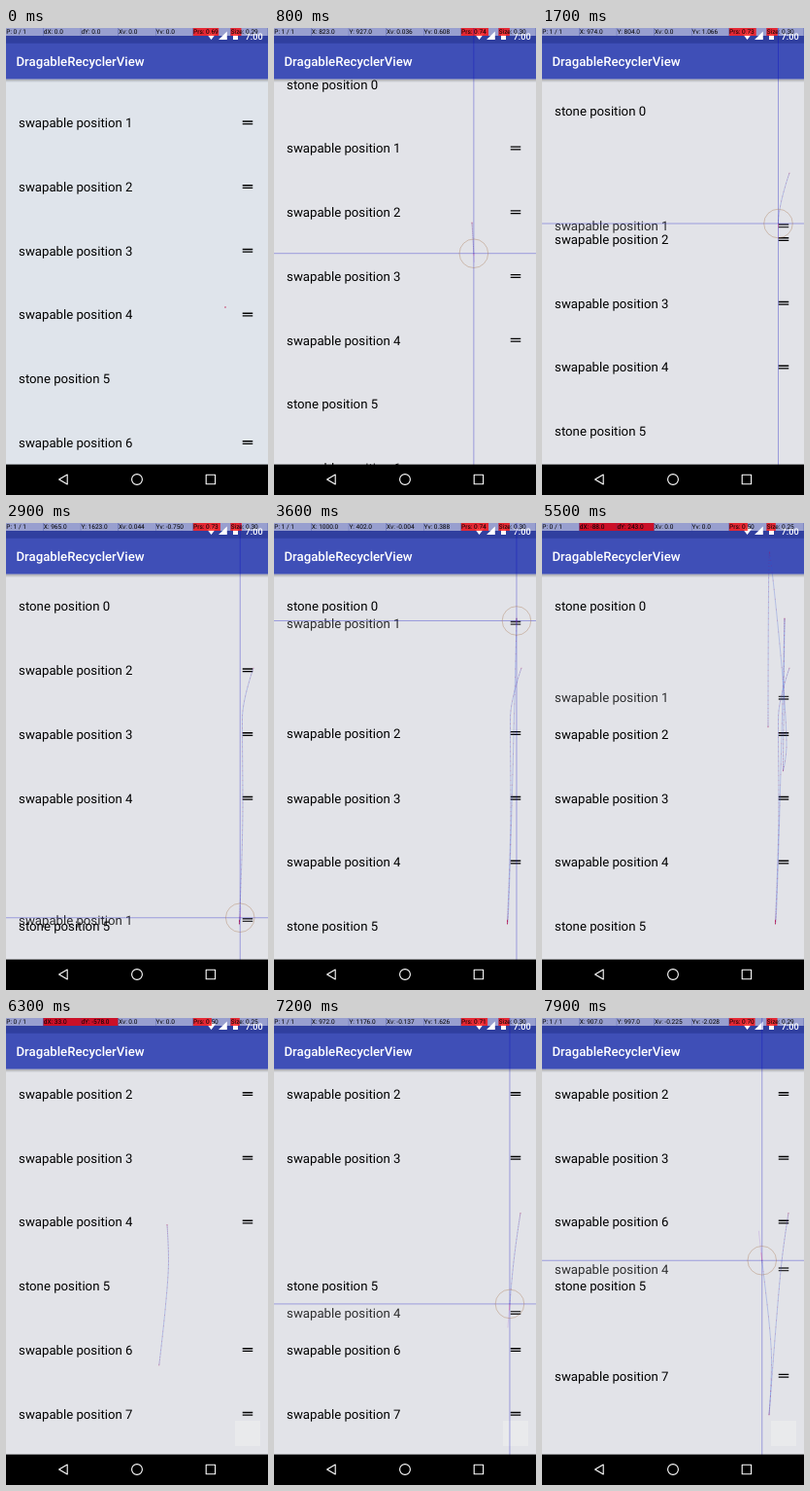
These frames come from a looping animation (270 by 480 pixels, 8 s). An HTML page:

```html
<!DOCTYPE html>
<html lang="en">
<head>
<meta charset="utf-8">
<title>Draggable list</title>
<style>
  html, body { margin: 0; width: 100%; height: 100%; overflow: hidden; background: #000; }
  svg { display: block; width: 270px; height: 480px; font-family: Roboto, sans-serif; text-rendering: geometricPrecision; }
  .row { font-size: 13.2px; fill: #000; }
  .title { font-size: 13.2px; font-weight: 500; fill: #fff; }
  .clock { font-size: 9.2px; font-weight: 500; fill: #fff; }
  .cell { font-size: 6.56px; fill: #000; }
  .plain { fill: #fff; fill-opacity: .5; }
  .level { fill: #f00; fill-opacity: .75; }
  .cross { stroke: #0000c0; stroke-opacity: .36; stroke-width: .9; }
  .ring { fill: none; stroke: #a87850; stroke-opacity: .55; stroke-width: .7; }
  .trace { fill: none; stroke: #2850d8; stroke-opacity: .5; stroke-width: .5; }
  .dots { fill: none; stroke: #c00040; stroke-opacity: .45; stroke-width: .6; stroke-linecap: round; }
  .guess { stroke: #8020d0; stroke-opacity: .3; stroke-width: .5; }
  .speed { stroke: #ff4080; stroke-opacity: .6; stroke-width: .5; }
  .nav { fill: none; stroke: #fff; stroke-width: 1.1; stroke-linejoin: round; }
</style>
</head>
<body>
<svg viewBox="0 0 270 480">
  <defs>
    <linearGradient id="shade" x2="0" y2="1">
      <stop offset="0" stop-opacity=".28"/>
      <stop offset="1" stop-opacity="0"/>
    </linearGradient>
  </defs>
  <rect id="page" width="270" height="449"/>
  <g id="rows"></g>
  <rect id="patch" x="236" y="414" width="26" height="26" fill="#e9eaec"/>

  <rect y="52.5" width="270" height="3.5" fill="url(#shade)"/>
  <rect width="270" height="16" fill="#303f9f"/>
  <rect y="15.75" width="270" height="36.75" fill="#3f4fb7"/>
  <text class="title" x="10.5" y="39">DragableRecyclerView</text>
  <path fill="#fff" d="M211.5 12L207 6.3Q211.5 2.6 216 6.3ZM219 12H227.8V3.4ZM234 5H235.5V4H237.5V5H239V12H234Z"/>
  <text class="clock" x="246.6" y="11.6">7:00</text>

  <g id="cells"></g>
  <path id="trace" class="trace"/>
  <path id="dots" class="dots"/>
  <g id="finger">
    <path class="cross" d="M-300 0H300M0 -500V500"/>
    <circle class="ring" r="14.8"/>
    <line id="guess" class="guess"/>
    <line id="speed" class="speed"/>
  </g>

  <rect y="448.6" width="270" height="31.4"/>
  <path class="nav" d="M63.2 459V469L54.6 464Z"/>
  <circle class="nav" cx="135" cy="464" r="5.4"/>
  <rect class="nav" x="206.2" y="459.3" width="9.4" height="9.4"/>
</svg>

<script>
const LOOP = 8000, STEP = 100, SETTLE = 250;
const PITCH = 65.75, TOP = 85.5, SLOP = 5.5, DENSITY = 4;
const START_SCROLL = 54, CELL = 270 / 7;
const $ = id => document.getElementById(id);

function add(parent, name, attrs, text) {
  const el = document.createElementNS('http://www.w3.org/2000/svg', name);
  for (const key in attrs) el.setAttribute(key, attrs[key]);
  if (text) el.textContent = text;
  return parent.appendChild(el);
}

// Key points of a finger path: time, x, y
const gesture = (knots, { row = null, lift = .5 } = {}) => ({
  knots, row, lift, start: knots[0][0], end: knots[knots.length - 1][0]
});

const tap = gesture([[-100, 226, 287], [0, 226, 287]], { lift: .69 });
const scrollUp = gesture([[480, 204, 200], [1150, 208, 268]]);
const dragFirst = gesture([
  [1480, 255, 149], [1700, 243.5, 201], [2000, 244, 290], [2500, 240.5, 409], [2600, 240.5, 409],
  [2800, 240.4, 412], [2900, 241.25, 405.75], [3550, 250, 98], [4220, 248.5, 255],
  [4300, 252, 228.75], [4650, 234.5, 30], [5370, 233, 209.75]
], { row: 1 });
const scrollDown = gesture([[5650, 157.75, 357], [6050, 167.5, 250], [6300, 166, 212.5]]);
const dragFourth = gesture([
  [6760, 254, 200.5], [7100, 246, 260], [7550, 234, 408],
  [7750, 236.5, 350], [7900, 226.75, 249.25], [8000, 222, 215]
], { row: 4 });
const gestures = [tap, scrollUp, dragFirst, scrollDown, dragFourth];
const drags = gestures.filter(g => g.row !== null);

// Tangent that never overshoots: zero at ends and turning points
function slope(knots, k, c) {
  const a = knots[k - 1], b = knots[k], d = knots[k + 1];
  if (!a || !d) return 0;
  const s = (b[c] - a[c]) / (b[0] - a[0]), u = (d[c] - b[c]) / (d[0] - b[0]);
  if (s * u <= 0) return 0;
  return Math.sign(s) * Math.min(Math.abs(s + u) / 2, 3 * Math.abs(s), 3 * Math.abs(u));
}

// Value and speed of one coordinate on a Hermite curve through the knots
function curve({ knots, start, end }, t, c) {
  t = Math.min(end, Math.max(start, t));
  let k = 0;
  while (k < knots.length - 2 && knots[k + 1][0] <= t) k++;
  const a = knots[k], b = knots[k + 1], h = b[0] - a[0], u = (t - a[0]) / h;
  const m = slope(knots, k, c) * h, n = slope(knots, k + 1, c) * h, d = b[c] - a[c];
  const p = 3 * d - 2 * m - n, q = m + n - 2 * d;
  return [a[c] + u * (m + u * (p + u * q)), (m + u * (2 * p + 3 * u * q)) / h];
}

function touch(g, t) {
  const [x, vx] = curve(g, t, 1), [y, vy] = curve(g, t, 2);
  // A faster finger presses less
  const press = t < g.end ? Math.max(.5, .74 - .01 * (vy * DENSITY) ** 2) : g.lift;
  return { x, y, vx, vy, press };
}

const travel = (g, t) => touch(g, t).y - g.knots[0][2];
const pulled = (g, t) => Math.max(0, Math.abs(travel(g, t)) - SLOP);
const scrollAt = t => Math.max(0, START_SCROLL - pulled(scrollUp, t)) + pulled(scrollDown, t);

const slotY = slot => TOP + PITCH * slot;
const isStone = i => i % 5 === 0;
const ease = u => .5 - Math.cos(Math.PI * Math.min(1, u)) / 2;
const moves = Array.from({ length: 9 }, () => []);

function rowY(i, t) {
  const d = drags.find(d => d.row === i && t >= d.start && t < d.end);
  if (d) return slotY(i) + travel(d, t);
  let y = slotY(i);
  for (const m of moves[i]) {
    if (t >= m.t) y = m.from + (m.to - m.from) * ease((t - m.t) / SETTLE);
  }
  return y;
}

// A dragged row trades places with each movable row whose slot it passes
function planMoves() {
  const order = moves.map((_, i) => i);
  for (const d of drags) {
    let slot = d.row, y;
    for (let t = d.start; t < d.end; t += 10) {
      y = rowY(d.row, t);
      for (const dir of [-1, 1]) {
        let next = slot + dir;
        while (next >= 0 && isStone(next)) next += dir;
        const other = order[next];
        if (other === undefined || (y - slotY(next)) * dir <= 0) continue;
        moves[other].push({ t, from: rowY(other, t), to: slotY(slot) });
        order[slot] = other;
        order[next] = d.row;
        slot = next;
      }
    }
    moves[d.row].push({ t: d.end, from: y, to: slotY(slot) });
  }
}
planMoves();

const rows = moves.map((_, i) => {
  const g = add($('rows'), 'g', { class: 'row' });
  add(g, 'text', { x: 13.1, y: 4.8 }, `${isStone(i) ? 'stone' : 'swapable'} position ${i}`);
  if (!isStone(i)) add(g, 'path', { d: 'M243.75 -2h10.5v1.4h-10.5zM243.75 .7h10.5v1.4h-10.5z' });
  return g;
});

const cells = Array.from({ length: 7 }, (_, i) => {
  const x = i * CELL, box = { x, width: CELL - .25, height: 8 };
  return {
    plain: add($('cells'), 'rect', { ...box, class: 'plain' }),
    level: add($('cells'), 'rect', { ...box, class: 'level' }),
    label: add($('cells'), 'text', { class: 'cell', x: x + .25, y: 6.2 })
  };
});

function setCell(i, text, level = 0) {
  const { plain, level: bar, label } = cells[i];
  label.textContent = text;
  plain.style.display = level === 1 ? 'none' : '';
  bar.setAttribute('width', Math.max(0, level * CELL - .25));
}

function drawCells(g, p, down) {
  const px = v => Math.round(v * DENSITY).toFixed(1);
  const speed = v => v ? (v * DENSITY).toFixed(3) : '0.0';
  const dx = p.x - g.knots[0][1], dy = p.y - g.knots[0][2];
  const far = d => !down && Math.abs(d) > SLOP ? 1 : 0;
  const size = .25 + (p.press - .5) * .225;
  setCell(0, `P: ${down ? 1 : 0} / 1`);
  setCell(1, down ? `X: ${px(p.x)}` : `dX: ${px(dx)}`, far(dx));
  setCell(2, down ? `Y: ${px(p.y)}` : `dY: ${px(dy)}`, far(dy));
  setCell(3, `Xv: ${speed(p.vx)}`);
  setCell(4, `Yv: ${speed(p.vy)}`);
  setCell(5, `Prs: ${p.press.toFixed(2)}`, p.press);
  setCell(6, `Size: ${size.toFixed(2)}`, size);
}

function drawTouch(g, t) {
  const p = touch(g, t), down = t < g.end;
  drawCells(g, p, down);

  let line = '', dots = '';
  const last = Math.min(t, g.end);
  for (let s = g.start; ; s = Math.min(last, s + 16)) {
    const { x, y } = touch(g, s), at = `${x.toFixed(2)} ${y.toFixed(2)}`;
    line += (line ? 'L' : 'M') + at;
    dots += `M${at}h.01`;
    if (s >= last) break;
  }
  $('trace').setAttribute('d', line);
  $('dots').setAttribute('d', dots);

  $('finger').style.display = down ? '' : 'none';
  $('finger').setAttribute('transform', `translate(${p.x} ${p.y})`);
  for (const [id, span] of [['guess', 60], ['speed', 16]]) {
    $(id).setAttribute('x2', p.vx * span);
    $(id).setAttribute('y2', p.vy * span);
  }
}

function draw(t) {
  const scroll = scrollAt(t);
  rows.forEach((row, i) => {
    const held = drags.some(d => d.row === i && t >= d.start && t < d.end + SETTLE);
    row.setAttribute('transform', `translate(0 ${rowY(i, t) - scroll})`);
    row.setAttribute('opacity', held ? .8 : 1);
  });
  $('page').setAttribute('fill', t < 500 ? '#dfe4eb' : '#e2e3e8');
  $('patch').style.display = t < 6200 ? 'none' : '';
  drawTouch(gestures.filter(g => g.start <= t).pop(), t);
}

const begin = performance.now();
let shown = -1;
function tick() {
  const t = Math.floor((performance.now() - begin) % LOOP / STEP) * STEP;
  if (t !== shown) draw(shown = t);
  requestAnimationFrame(tick);
}
tick();
</script>
</body>
</html>
```
